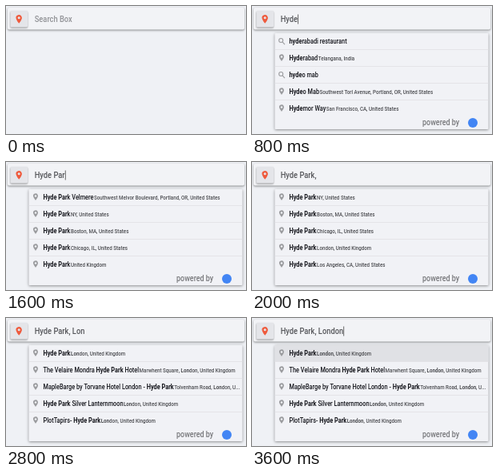
An HTML page with a canvas that plays this animation: 300 px wide and 160 px high, repeating every 4.8 s.

```html
<!DOCTYPE html>
<html lang="en">
<head>
<meta charset="utf-8">
<title>Place search</title>
<style>
html, body { margin: 0; width: 100%; height: 100%; overflow: hidden; background: #eff1f5; }
canvas { display: block; width: 300px; height: 160px; }
</style>
</head>
<body>
<canvas id="stage"></canvas>
<script>
const canvas = document.getElementById('stage');
const ctx = canvas.getContext('2d');
const dpr = window.devicePixelRatio || 1;
canvas.width = 300 * dpr;
canvas.height = 160 * dpr;

const LOOP = 4800, STEP = 200;
const SQUEEZE = 0.84; // the whole picture has narrow pixels
const FAMILY = 'Roboto, "Liberation Sans", sans-serif';
const QUERY = 'Hyde Park, London';

// "?" marks a search term, "|" starts the smaller address part.
const LISTS = {
  h: ['?hotels', '?hospital', '?hardware store', '?hair salon', '?hylanto'],
  hy: ['?hylanto dealer',
    'Hylor Lodge Portland/Downtown|Southwest Olven Drive, Portland, OR, United States',
    '?hypermarket', '?hydroponics equipment supplier', '?hylanto'],
  hyd: ['?hydroponics equipment supplier', '?hyderabadi restaurant',
    'Hyderabad|Telangana, India', '?hydeo mab',
    'Hydeo Mab|Southwest Torl Avenue, Portland, OR, United States'],
  hyde: ['?hyderabadi restaurant', 'Hyderabad|Telangana, India', '?hydeo mab',
    'Hydeo Mab|Southwest Torl Avenue, Portland, OR, United States',
    'Hydemor Way|San Francisco, CA, United States'],
  park: ['Hyde Park Velmere|Southwest Melvor Boulevard, Portland, OR, United States',
    'Hyde Park|NY, United States', 'Hyde Park|Boston, MA, United States',
    'Hyde Park|Chicago, IL, United States', 'Hyde Park|United Kingdom'],
  comma: ['Hyde Park|NY, United States', 'Hyde Park|Boston, MA, United States',
    'Hyde Park|Chicago, IL, United States', 'Hyde Park|London, United Kingdom',
    'Hyde Park|Los Angeles, CA, United States'],
  l: ['Hyde Park|London, United Kingdom', 'Hyde Park Ly|Naperville, IL, United States',
    'Hyde Park|Los Angeles, CA, United States', 'Hyde Park Lorne|Manteca, CA, United States',
    'Hyde Park Lumbra|North Elva Street, San Jose, CA, United States'],
  london: ['Hyde Park|London, United Kingdom',
    'The Velaire Mondra Hyde Park Hotel|Marwhent Square, London, United Kingdom',
    'MapleBarge by Torvane Hotel London - Hyde Park|Tolvenham Road, London, United Kingdom',
    'Hyde Park Silver Lanternmoon|London, United Kingdom',
    'PlotTapirs- Hyde Park|London, United Kingdom']
};

function typedAt(t) {
  const n = Math.floor(t / STEP);
  if (n <= 10) return QUERY.slice(0, n);
  return QUERY.slice(0, n === 11 ? 11 : Math.min(n, QUERY.length));
}

function listFor(query) {
  const n = query.length;
  if (n <= 4) return LISTS[query.toLowerCase()];
  if (n < 10) return LISTS.park;
  if (n < 12) return LISTS.comma;
  return n === 12 ? LISTS.l : LISTS.london;
}

function box(x, y, w, h, r, fill, blur, shade) {
  ctx.save();
  ctx.shadowColor = `rgba(0,0,0,${shade})`;
  ctx.shadowBlur = blur * dpr;
  ctx.shadowOffsetY = dpr;
  ctx.fillStyle = fill;
  ctx.beginPath();
  ctx.roundRect(x, y, w, h, r);
  ctx.fill();
  ctx.restore();
}

// Draws text and returns its right edge.
function write(text, x, y, size, color, weight = 500) {
  ctx.font = `${weight} ${size}px ${FAMILY}`;
  ctx.fillStyle = color;
  ctx.save();
  ctx.translate(x, y);
  ctx.scale(SQUEEZE, 1);
  ctx.fillText(text, 0, 0);
  ctx.restore();
  return x + ctx.measureText(text).width * SQUEEZE;
}

function fitText(text, room) {
  const wide = s => ctx.measureText(s).width * SQUEEZE > room;
  if (!wide(text)) return text;
  while (text && wide(text + '...')) text = text.slice(0, -1);
  return text + '...';
}

function writeMatched(text, match, x, y, size, color) {
  const parts = match ? text.split(new RegExp(`(\\b${match})`, 'i')) : [text];
  parts.forEach((part, i) => {
    if (!part) return;
    const weight = i % 2 ? 700 : 500;
    ctx.font = `${weight} ${size}px ${FAMILY}`;
    x = write(fitText(part, 294 - x), x, y, size, color, weight);
  });
  return x;
}

function pin(x, y, s, color, hole) {
  ctx.fillStyle = color;
  ctx.beginPath();
  ctx.arc(x, y, s, Math.PI * 0.9, Math.PI * 0.1);
  ctx.quadraticCurveTo(x + s * 0.75, y + s, x, y + s * 1.85);
  ctx.quadraticCurveTo(x - s * 0.75, y + s, x - s * 0.95, y + s * 0.31);
  ctx.fill();
  ctx.fillStyle = hole;
  ctx.beginPath();
  ctx.arc(x, y, s * 0.42, 0, 7);
  ctx.fill();
}

function lens(x, y) {
  ctx.strokeStyle = '#9b9c9f';
  ctx.lineWidth = 1.1;
  ctx.beginPath();
  ctx.arc(x - 0.8, y - 1, 2.5, 0, 7);
  ctx.moveTo(x + 1, y + 0.9);
  ctx.lineTo(x + 4, y + 4.2);
  ctx.stroke();
}

function field(query, caret) {
  box(2, 2, 296, 27.5, 2, '#f2f3f6', 2.5, 0.45);
  box(5.5, 6, 21.5, 20.5, 1.5, '#e4e5e9', 2, 0.4);
  pin(16.2, 14.8, 3.7, '#ef5a3c', '#e4e5e9');
  const end = write(query || 'Search Box', 35.7, 20, 11.1, query ? '#55565a' : '#929397');
  if (caret) {
    ctx.fillStyle = '#444';
    ctx.fillRect(end + 0.2, 10.5, 0.8, 12);
  }
}

function row(item, i, head, tail) {
  const y = 44 + i * 21;
  const isTerm = item[0] === '?';
  const [main, place] = item.replace('?', '').split('|');
  if (i) {
    ctx.fillStyle = '#e1e2e5';
    ctx.fillRect(28.5, y - 10.8, 267, 0.8);
  }
  if (isTerm) lens(37, y);
  else pin(37, y - 1.6, 3, '#9b9c9f', '#f1f2f6');
  const end = writeMatched(main, head + (tail ? `(?: ${tail})?` : ''), 46.5, y + 3, 8.75, '#15161c');
  if (place) writeMatched(place, tail, end + 0.5, y + 3, 7.4, '#4b4c50');
}

function panel(query, chosen) {
  const [head, tail = ''] = query.trim().replace(/,$/, '').split(', ');
  box(28.5, 34, 267, 120, 1, '#f1f2f6', 3.5, 0.42);
  if (chosen) {
    ctx.fillStyle = '#e0e1e5';
    ctx.fillRect(28.5, 34, 267, 20.3);
  }
  listFor(query).forEach((item, i) => row(item, i, head, tail));
  write('powered by', 213, 149.3, 10.7, '#77787b');
  ctx.fillStyle = '#4285f4';
  ctx.beginPath();
  ctx.arc(276, 146, 6, 0, 7);
  ctx.fill();
}

function draw(now) {
  const t = now % LOOP;
  const query = typedAt(t);
  ctx.setTransform(dpr, 0, 0, dpr, 0, 0);
  ctx.fillStyle = '#eff1f5';
  ctx.fillRect(0, 0, 300, 160);
  field(query, query && (t < 2000 || t >= 3200));
  if (query) panel(query, t >= 3600);
  requestAnimationFrame(draw);
}
requestAnimationFrame(draw);
</script>
</body>
</html>
```
